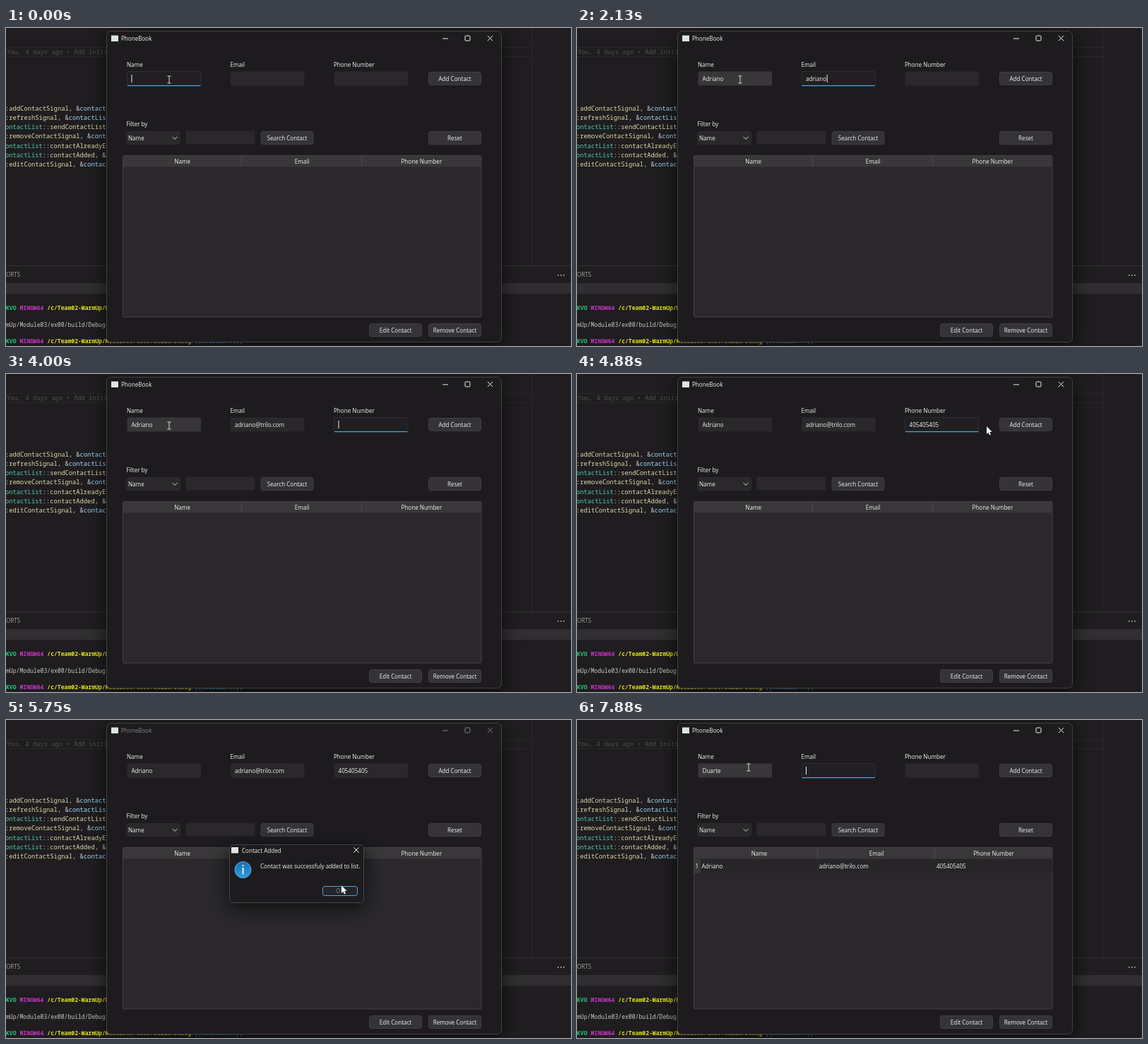
Recreate the animation shown at these times as an HTML page with a canvas. Size 800x450 px, loop 8 s.

```html
<!DOCTYPE html>
<html lang="en">
<head>
<meta charset="utf-8">
<title>PhoneBook</title>
<style>
html, body { margin: 0; width: 100%; height: 100%; overflow: hidden; background: #1f1d1f; }
canvas { display: block; width: 100vw; height: 100vh; }
</style>
</head>
<body>
<canvas id="stage" width="800" height="450"></canvas>
<script>
const ctx = document.getElementById('stage').getContext('2d');
const LOOP = 8000, STEP = 125;
const UI = '8.1px "Open Sans", "Noto Sans", sans-serif';
const CODE = '8.8px "Noto Sans Mono", "DejaVu Sans Mono", monospace';
const TERM = '8.1px "Noto Sans Mono", "DejaVu Sans Mono", monospace';
const WHITE = '#f2f2f2', GREY = '#c8c8c8', BLUE = '#4aa9dc';
const YELLOW = '#dcdcaa', TEAL = '#4ec9b0', SKY = '#9cdcfe';

const contact = { name: 'Adriano', email: 'adriano@trilo.com', phone: '405405405' };
const second = 'Duarte';

// Key press times for each typed text
const evenly = (from, gap, n) => Array.from({ length: n }, (_, i) => from + i * gap);
const keys = {
  name: evenly(250, 125, 7),
  email: [...evenly(1375, 125, 7), 2500, 2750, 2875, 3125, 3250, 3375, 3375, 3500, 3500, 3625],
  phone: evenly(4065, 70, 9),
  second: [6625, 6875, 7000, 7125, 7250, 7375]
};
const typed = (text, times, t) => text.slice(0, times.filter(k => k <= t).length);

// Pointer stops: time, x, y
const path = [
  [0, 231, 73], [4625, 231, 73], [4875, 580, 74], [5125, 624, 73], [5250, 624, 73],
  [5625, 475, 234], [5750, 475, 234], [6250, 243, 67], [LOOP, 243, 67]
];
const DIALOG_IN = 5250, DIALOG_OUT = 5875;

function pointer(t) {
  const i = Math.max(1, path.findIndex(p => p[0] > t));
  const [a, b] = [path[i - 1], path[i]];
  const u = (t - a[0]) / (b[0] - a[0]), e = u * u * (3 - 2 * u);
  return { x: a[1] + (b[1] - a[1]) * e, y: a[2] + (b[2] - a[2]) * e };
}

function rect(x, y, w, h, fill) {
  ctx.fillStyle = fill;
  ctx.fillRect(x, y, w, h);
}

function box(x, y, w, h, r, fill, stroke) {
  ctx.beginPath();
  ctx.roundRect(x + .5, y + .5, w - 1, h - 1, r);
  ctx.fillStyle = fill;
  ctx.fill();
  if (stroke) {
    ctx.shadowColor = 'transparent';
    ctx.strokeStyle = stroke;
    ctx.lineWidth = 1;
    ctx.stroke();
  }
}

function line(points, color, width = 1) {
  ctx.beginPath();
  points.forEach(([x, y]) => ctx.lineTo(x, y));
  ctx.strokeStyle = color;
  ctx.lineWidth = width;
  ctx.stroke();
}

function text(s, x, y, color = WHITE, align = 'left', font = UI) {
  ctx.font = font;
  ctx.textAlign = align;
  ctx.fillStyle = color;
  ctx.fillText(s, x, y);
  return ctx.measureText(s).width;
}

function runs(x, y, font, parts) {
  for (const [s, color] of parts) x += text(s, x, y, color, 'left', font);
}

function shadowed(blur, alpha, draw) {
  ctx.save();
  ctx.shadowColor = `rgba(0,0,0,${alpha})`;
  ctx.shadowBlur = blur;
  ctx.shadowOffsetY = blur / 4;
  draw();
  ctx.restore();
}

function cross(x, y, r, color) {
  line([[x - r, y - r], [x + r, y + r]], color);
  line([[x + r, y - r], [x - r, y + r]], color);
}

function button(label, x, y, hover) {
  box(x, y, 75, 19, 3, hover ? '#3d3b3f' : '#353337', '#413f43');
  text(label, x + 37.5, y + 13, WHITE, 'center');
}

function editor() {
  rect(0, 0, 800, 450, '#1f1d1f');
  rect(0, 27, 744, 1, '#2a282a');
  rect(0, 40, 744, 1, '#2a282a');
  rect(744, 0, 1, 336, '#2a282a');
  text('You, 4 days ago • Add initial', 1, 37, '#505050', 'left', CODE);

  const signal = (name, arg) => [[':' + name, YELLOW], [', &', GREY], [arg, SKY]];
  const member = (name, rest) => [['ontactList', TEAL], ['::', GREY], [name, YELLOW], [rest, GREY]];
  [
    signal('addContactSignal', 'contactList'),
    signal('refreshSignal', 'contactList'),
    member('sendContactList', ','),
    signal('removeContactSignal', 'contact'),
    member('contactAlreadyExists', ','),
    member('contactAdded', ', &'),
    signal('editContactSignal', 'contactList')
  ].forEach((parts, i) => runs(-1, 116.5 + i * 13.3, CODE, parts));

  rect(0, 336, 800, 1, '#343234');
  text('ORTS', 0, 352, '#a5a5a5');
  for (let i = 0; i < 3; i++) rect(781 + i * 4, 349, 1.6, 1.6, '#c0c0c0');
  rect(0, 361, 800, 15, '#302e30');

  const bold = 'bold ' + TERM, dir = '/c/Team02-WarmUp/Module03/ex00/build/Debug';
  const prompt = [['KVO ', '#1fc77c'], ['MINGW64 ', '#c435c4'], [dir, '#e2e21c']];
  runs(0, 399, bold, prompt);
  text('mUp/Module03/ex00/build/Debug', 0, 423, GREY, 'left', TERM);
  runs(0, 446, bold, [...prompt, [' ((65eaddd...))', '#2a9db0']]);
}

function field(x, label, value, focus, hover, caret) {
  text(label, x, 55);
  box(x, 61, 105.5, 21, 2, focus ? '#211f22' : hover ? '#383639' : '#2a282b', focus ? '#302e31' : null);
  if (focus) rect(x + 1, 81, 103.5, 1.2, BLUE);
  const w = text(value, x + 6.5, 75);
  if (focus && caret) rect(x + 6.5 + w + (value ? .5 : 0), 66, 1, 11, WHITE);
}

function table(filled) {
  box(165, 180, 508.5, 229.5, 2, '#2a282b', '#454346');
  rect(166, 181, 507, 15, '#393739');
  rect(166, 196, 507, 1, '#302e31');
  const left = filled ? 175 : 165, w = (673 - left) / 3;
  ['Name', 'Email', 'Phone Number'].forEach((label, i) => {
    text(label, left + w * (i + .5), 191.5, WHITE, 'center');
    if (i) rect(Math.round(left + w * i) - 1, 181, 1, 15, '#4c4a4d');
  });
  if (!filled) return;
  rect(166, 197, 9, 20, '#393739');
  rect(175, 197, 498, 20, '#272528');
  text('1', 167.5, 210);
  Object.values(contact).forEach((s, i) => text(s, left + 1.5 + w * i + i * .3, 210));
}

function appWindow(t, mouse) {
  const modal = t >= DIALOG_IN && t < DIALOG_OUT, added = t >= DIALOG_OUT;
  const chrome = modal ? '#858386' : WHITE;
  shadowed(26, .65, () => box(142, 4, 560, 441, 6, '#1d1b1e', '#434144'));

  rect(149, 10.5, 10, 8.5, '#dde6e4');
  text('PhoneBook', 163, 18, chrome);
  line([[618, 15], [626, 15]], chrome);
  ctx.beginPath();
  ctx.roundRect(650, 11, 7, 7, 1.2);
  ctx.stroke();
  cross(685.5, 14.5, 3.6, chrome);

  let focus = 'name';
  if (modal) focus = '';
  else if (added) focus = t < 6250 ? '' : t < 7625 ? 'name' : 'email';
  else if (t >= 4000) focus = 'phone';
  else if (t >= 1250) focus = 'email';

  const caret = !(t >= 4750 && t < 5250);
  const over = (x, y, w, h) => !modal && mouse.x >= x && mouse.x < x + w && mouse.y >= y && mouse.y < y + h;
  [
    [171, 'Name', 'name', added ? typed(second, keys.second, t) : typed(contact.name, keys.name, t)],
    [317.5, 'Email', 'email', added ? '' : typed(contact.email, keys.email, t)],
    [464, 'Phone Number', 'phone', added ? '' : typed(contact.phone, keys.phone, t)]
  ].forEach(([x, label, id, value]) =>
    field(x, label, value, focus === id, over(x, 61, 105, 21), caret));
  button('Add Contact', 598, 62, over(598, 62, 75, 19));

  text('Filter by', 170.5, 139);
  box(170, 146, 77, 19, 3, '#2a282b', '#2d2b2e');
  text('Name', 173, 158.5);
  line([[235.5, 154], [239, 157.3], [242.5, 154]], '#d8d8d8');
  box(254, 145, 99, 20, 2, '#2a282b');
  button('Search Contact', 360.5, 146);
  button('Reset', 598, 146);
  table(added);
  button('Edit Contact', 514, 418);
  button('Remove Contact', 598, 418);

  if (modal) dialog(t >= 5750);
}

function dialog(pressed) {
  shadowed(28, .75, () => box(316, 176, 191, 83, 5, '#1d1b1e', '#474548'));
  rect(319, 180, 10, 8.5, '#dde6e4');
  text('Contact Added', 334, 187.5);
  cross(496, 184, 3.6, WHITE);

  ctx.beginPath();
  ctx.arc(335.5, 212, 11.5, 0, 2 * Math.PI);
  const glow = ctx.createLinearGradient(0, 200, 0, 224);
  glow.addColorStop(0, '#1b6fae');
  glow.addColorStop(1, '#2f9de0');
  ctx.fillStyle = glow;
  ctx.fill();
  ctx.strokeStyle = '#5bb0e2';
  ctx.lineWidth = 1;
  ctx.stroke();
  rect(334.6, 205, 2, 2, '#e8f4fb');
  rect(334.6, 208.8, 2, 9.5, '#e8f4fb');

  text('Contact was successfuly added to list.', 360, 210);
  box(448, 235, 50, 14, 3, pressed ? '#262427' : '#353337', BLUE);
  text('OK', 473, 245, pressed ? '#8d8b8e' : WHITE, 'center');
}

function drawPointer({ x, y }, t) {
  const inField = y > 60 && y < 83 && [171, 317, 464].some(l => x >= l && x < l + 106);
  if (inField && !(t >= DIALOG_IN && t < DIALOG_OUT)) {
    const c = Math.round(x), m = Math.round(y);
    rect(c - .5, m - 5, 1, 10, '#d5d5d5');
    rect(c - 2.5, m - 5.5, 5, 1, '#d5d5d5');
    rect(c - 2.5, m + 4.5, 5, 1, '#d5d5d5');
    return;
  }
  ctx.save();
  ctx.translate(x, y);
  ctx.beginPath();
  [[0, 0], [0, 11], [2.4, 8.8], [4.1, 12.6], [6, 11.8], [4.3, 8.1], [7.7, 8]].forEach(p => ctx.lineTo(...p));
  ctx.closePath();
  ctx.fillStyle = '#fff';
  ctx.strokeStyle = '#111';
  ctx.lineWidth = 1;
  ctx.stroke();
  ctx.fill();
  ctx.restore();
}

function frame(now) {
  const t = Math.floor((now % LOOP) / STEP) * STEP;
  const mouse = pointer(t);
  editor();
  appWindow(t, mouse);
  drawPointer(mouse, t);
  requestAnimationFrame(frame);
}
requestAnimationFrame(frame);
</script>
</body>
</html>
```
